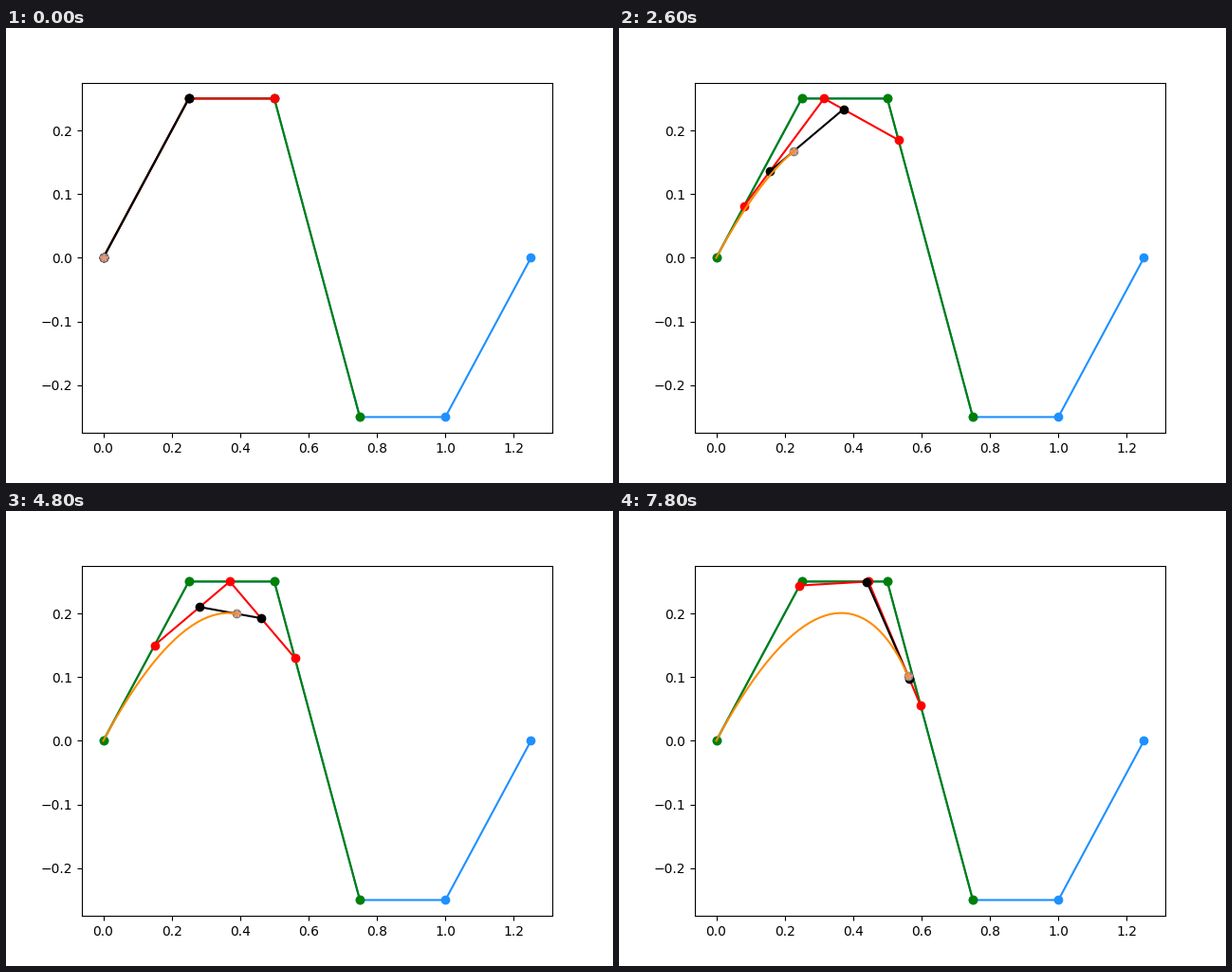
A matplotlib script that plays this animation: 640 by 480 pixels, repeating every 8000 ms.

```python
import numpy as np
import matplotlib.pyplot as plt
from matplotlib.animation import FuncAnimation

FRAMES = 40
STEP = 0.01
DEGREE = 3

# Control polygon: one coarse sine wave, rounded to steps of 0.25.
k = np.arange(6)
CONTROL = 0.25 * np.column_stack([k, np.round(np.sin(2 * np.pi * k / 5))])

# Clamped knots with two inner values.
KNOTS = np.pad([0.4, 0.5], DEGREE + 1, constant_values=(0, 1))


def de_boor(u, span=DEGREE):
    """Return the point sets of every level of de Boor's scheme at u."""
    levels = [CONTROL[span - DEGREE:span + 1]]
    for r in range(1, DEGREE + 1):
        prev = levels[-1]
        i = np.arange(span - DEGREE + r, span + 1)
        lo, hi = KNOTS[i], KNOTS[i + DEGREE - r + 1]
        a = ((u - lo) / (hi - lo))[:, None]
        levels.append((1 - a) * prev[:-1] + a * prev[1:])
    return levels


fig, ax = plt.subplots(figsize=(6.4, 4.8), dpi=100)
ax.plot(*CONTROL.T, "o-", color="dodgerblue")
level_lines = [ax.plot([0], [0], "o-", color=c)[0]
               for c in ("green", "red", "black", "gray")]
tip, = ax.plot([0], [0], "*", color="darksalmon")
curve, = ax.plot([0], [0], color="darkorange")

path = np.array([de_boor(n * STEP)[-1][0] for n in range(FRAMES)])


def update(n):
    for line, points in zip(level_lines, de_boor(n * STEP)):
        line.set_data(*points.T)
    tip.set_data(*path[n:n + 1].T)
    curve.set_data(*path[:n + 1].T)
    return [*level_lines, tip, curve]


anim = FuncAnimation(fig, update, frames=FRAMES, interval=200,
                     repeat=True, repeat_delay=0)
plt.show()
```
